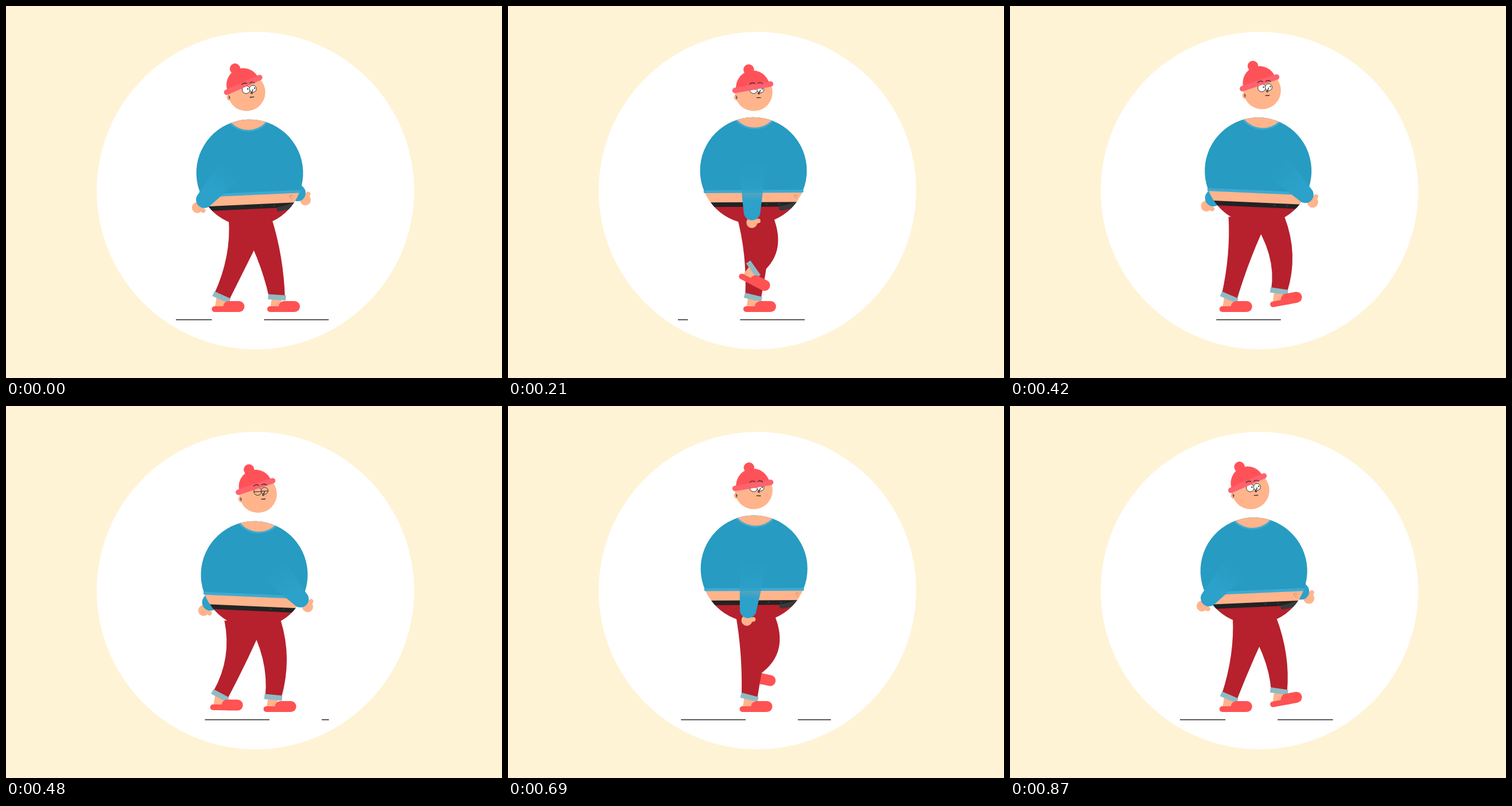
An HTML page with a canvas for the animation above (900 ms loop, 864x648 px).

```html
<!DOCTYPE html>
<html lang="en">
<head>
<meta charset="utf-8">
<title>Walk cycle</title>
<style>
  html, body { margin: 0; width: 100%; height: 100%; overflow: hidden; background: #fff3d5; }
  canvas { display: block; }
</style>
</head>
<body>
<canvas width="864" height="648"></canvas>
<script>
const ctx = document.querySelector('canvas').getContext('2d');
const TAU = Math.PI * 2, LOOP = 900, STEP = LOOP / 2, TICK = 30;
const SPEED = 0.2147, LIFT_OFF = 465;
const SKIN = '#ffb48c', SHIRT = '#279bc1', SLEEVE = '#2ca1ca', TRIM = '#3eaad2',
      PANTS = '#b6212d', CUFF = '#90bbc4', SHOE = '#ff5252', HAT = '#ff5258',
      BRIM = '#fe626d', INK = '#222324';

const wave = (t, period, peak = 0) => Math.cos(TAU * (t - peak) / period);
const rad = deg => deg * TAU / 360;
// How low the body sinks, -1 to 1, once per step
const dip = t => wave(t, STEP, 88);

function at(x, y, deg, draw) {
  ctx.save();
  ctx.translate(x, y);
  ctx.rotate(rad(deg));
  draw();
  ctx.restore();
}

function disc(x, y, r, fill) {
  ctx.beginPath();
  ctx.arc(x, y, r, 0, TAU);
  ctx.fillStyle = fill;
  ctx.fill();
}

function box(x, y, w, h, fill, r = 0) {
  ctx.beginPath();
  ctx.roundRect(x, y, w, h, r);
  ctx.fillStyle = fill;
  ctx.fill();
}

function stroke(path, color, width, cap = 'round') {
  ctx.strokeStyle = color;
  ctx.lineWidth = width;
  ctx.lineCap = cap;
  ctx.lineJoin = 'round';
  ctx.stroke(new Path2D(path));
}

function ground(t) {
  ctx.save();
  ctx.beginPath();
  ctx.rect(296, 540, 266.5, 12);
  ctx.clip();
  for (let k = -1; k < 3; k++)
    box(449.5 - t * SPEED + k * 203.5, 545.7, 112.5, 1.6, INK);
  ctx.restore();
}

// The foot slides back with the ground, then swings forward in an arc
function footPose(u) {
  if (u < LIFT_OFF) return { x: 483.5 - u * SPEED, y: 533, tilt: 0, cuff: 4 + 0.045 * u, air: 0, kick: 0 };
  const s = (u - LIFT_OFF) / (LOOP - LIFT_OFF), late = s ** 1.2;
  const kick = Math.sin(Math.PI * late), air = Math.sin(Math.PI * s);
  const tilt = 42 * Math.sin(TAU * late) * Math.sqrt(kick);
  return {
    x: 483.5 - SPEED * LIFT_OFF * (1 - s * s * (3 - 2 * s)),
    y: 533 - 50 * kick,
    tilt, air, kick,
    cuff: 25 - 21 * s + 30 * air + 0.35 * tilt
  };
}

// u is the time since this leg's heel touched down
function leg(u, bodyY, sway) {
  const { x, y, tilt, cuff, air, kick } = footPose(u);
  const reach = wave(u, LOOP), shift = sway * (2 + 6 * reach);
  const sin = Math.sin(rad(tilt)), cos = Math.cos(rad(tilt));
  const local = (px, py) => [x + px * cos - py * sin, y + px * sin + py * cos];
  const [cx, cy] = local(-11.5 + 0.25 * Math.max(0, -tilt), -25.5);
  const dx = 14 * Math.cos(rad(cuff)), dy = 14 * Math.sin(rad(cuff));
  const hipY = bodyY + 80, kneeY = bodyY + 146;
  const backHip = 398 + 14 * reach + shift, frontHip = 463 + 8 * reach + shift;
  const backBend = 12 + 10 * dip(u) + 60 * air;
  const frontBend = 4 + 9 * dip(u) + 6 * reach + 40 * kick;

  ctx.beginPath();
  ctx.moveTo(backHip, hipY);
  ctx.quadraticCurveTo((backHip + cx - dx + shift) / 2 + backBend, kneeY, cx - dx, cy - dy);
  ctx.lineTo(cx + dx, cy + dy);
  ctx.quadraticCurveTo((frontHip + cx + dx + shift) / 2 + frontBend, kneeY, frontHip, hipY);
  ctx.fillStyle = PANTS;
  ctx.fill();

  stroke(`M${cx},${cy}L${local(-14.5, -8)}`, SKIN, 17, 'butt');
  at(cx, cy, cuff, () => box(-15.5, -4.5, 31, 9, CUFF));
  at(x, y, tilt, () => {
    box(-28.5, -10, 40, 10, SHOE, 5);
    box(-8.5, -19, 37, 19, SHOE, 9.5);
  });
}

function arm(t, x, y, drop, fade) {
  const swing = -wave(t, LOOP);
  const shoulder = 2 + 35 * swing;
  const wrist = 2 + 81 * swing + 4 * Math.sin(TAU * t / LOOP);
  const dx = wrist - shoulder;
  const dy = 77 - 26 * (wrist / 80) ** 2 - drop * Math.max(0, wrist);
  const len = Math.hypot(dx, dy);
  at(x + shoulder, y - 5, -Math.atan2(dx, dy) * 360 / TAU, () => {
    disc(0, len + 18.5, 9.5, SKIN);
    stroke(`M4,${len + 17}L11,${len + 15.5}`, SKIN, 8);
    const shade = ctx.createLinearGradient(0, -8, 0, len * 0.75);
    shade.addColorStop(0, fade ? SLEEVE + '10' : SLEEVE);
    shade.addColorStop(1, SLEEVE);
    ctx.beginPath();
    ctx.moveTo(-24, -6);
    ctx.lineTo(-14.5, len);
    ctx.arc(0, len, 14.5, Math.PI, 0, true);
    ctx.lineTo(24, -6);
    ctx.fillStyle = shade;
    ctx.fill();
  });
}

function torso(x, y, sway, tilt) {
  at(x, y, tilt, () => {
    ctx.save();
    ctx.beginPath();
    ctx.arc(0, 0, 93, 0, TAU);
    ctx.clip();
    box(-95, 60, 190, 40, PANTS);
    box(-95, 36, 190, 20, SKIN);
    box(-95, 55, 190, 8, INK);
    box(-95, -95, 190, 131, SHIRT);
    disc(2.7, -117, 45, TRIM);
    disc(2.7, -117, 42, SKIN);
    disc(24.5 + 7 * sway, 58.5, 1.2, '#444');
    disc(46.5 + 7 * sway, 58.5, 1.2, '#444');
    if (sway < 0.2) stroke('M48,65.5Q56,65 75,59', '#39393b', 8);
    at(75 + 5 * sway, 46, 0, () => stroke('M-3,-2Q0,-5 3,-2M-3,-2Q0,1 1,3', '#d98a64', 1));
    ctx.restore();
    box(-87, 33.7, 174, 5, TRIM, 2);
  });
}

function eye(x, y, r, closed) {
  disc(x, y, r, closed ? SKIN : '#fff');
  ctx.strokeStyle = INK;
  ctx.lineWidth = 0.9;
  ctx.stroke();
  if (closed) stroke(`M${x - r},${y + 0.5}H${x + r}`, INK, 1);
  else disc(x + 3, y - 1, 1.2, INK);
}

function head(x, y, tilt, lift, closed) {
  disc(x, y, 32.8, SKIN);
  disc(x - 29, y + 9, 5.5, SKIN);
  at(x - 30, y + 9, 0, () => stroke('M-1,-3Q2,-1 0,3M-1,0H1', INK, 1));
  const turn = (tilt + 12) * 0.4;
  at(x, y, turn, () => {
    eye(-0.3, -4.5, 6.8, closed);
    eye(11.7, -5, 6, closed);
    stroke('M11.5,-4Q11,0 7.5,2Q8.5,4 10.5,2.5', INK, 1.2);
    stroke('M5.5,9.3H12', INK, 1.3);
  });
  at(x, y, tilt, () => {
    disc(-1.5, -lift - 31.5, 9.2, HAT);
    ctx.beginPath();
    ctx.arc(0, -lift, 29.2, Math.PI, 0);
    ctx.fillStyle = HAT;
    ctx.fill();
    stroke(`M-31.5,${-lift}H31.5`, BRIM, 9.5);
  });
  at(x, y, turn, () => stroke('M-7,-14Q-3,-18 2,-15M7,-15.5Q11,-18.5 15.5,-15', INK, 1.1));
}

function draw(t) {
  const sway = -wave(t, LOOP, 20), swing = -wave(t, LOOP), nod = wave(t, STEP);
  const x = 428.5 + 4 * sway, y = 287.9 + 8.5 * dip(t);

  box(0, 0, 864, 648, '#fff3d5');
  disc(434.5, 321.6, 276.5, '#fff');
  ground(t);
  arm(t + STEP, x, y, 0.11, false);
  leg(t, y, sway);
  leg((t + STEP) % LOOP, y, sway);
  torso(x, y, sway, 2.6 * swing);
  arm(t, x, y, 0.04, true);
  head(429.1 + 10.2 * swing, 149.4 + 7.7 * wave(t, STEP, 105),
    -15.6 - 6 * nod + 2.5 * sway, 11.4 + 2.6 * nod, t >= 450 && t < 540);
}

const start = performance.now();
function frame() {
  const elapsed = performance.now() - start;
  draw(Math.floor(elapsed / TICK) * TICK % LOOP);
  requestAnimationFrame(frame);
}
frame();
</script>
</body>
</html>
```
